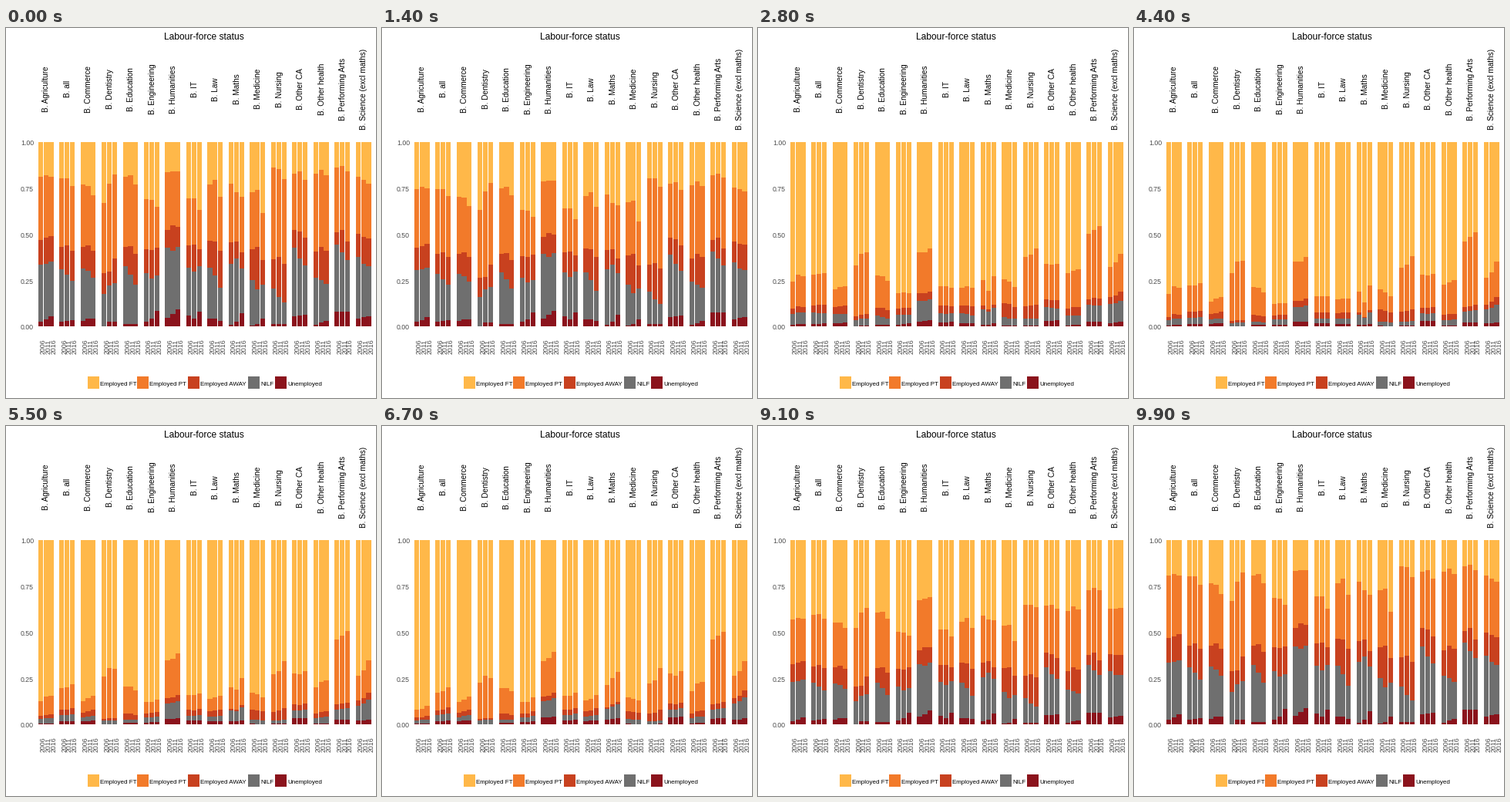
These frames come from a looping animation (480x480 px, 10 s). A matplotlib script:

```python
import numpy as np
import matplotlib.pyplot as plt
from matplotlib.animation import FuncAnimation
from matplotlib.patches import Rectangle

plt.rcParams["font.family"] = "Liberation Sans"

SIZE, DPI = 480, 72
FRAMES, INTERVAL = 100, 100
BASE, HEIGHT = 387, 239
LEFT, PITCH, STEP, BAR = 41.65, 27.47, 6.86, 6.17
GREY = "#4D4D4D"
COLORS = ["#FFB849", "#F27A2A", "#C8411F", "#6F6F6F", "#8B131C"]
YEARS = ["2006", "2011", "2016"]
DEGREES = ["Agriculture", "all", "Commerce", "Dentistry", "Education",
           "Engineering", "Humanities", "IT", "Law", "Maths", "Medicine",
           "Nursing", "Other CA", "Other health", "Performing Arts",
           "Science (excl maths)"]

# Stage one, percent: tops of part-time, away and not-in-labour-force by year
EARLY = [
    (81, 82, 81, 47, 48, 49, 33.5, 34, 35),
    (80.5, 80.5, 76, 43, 44, 41, 31, 28, 24.5),
    (77, 76, 71, 43, 44, 41, 31.5, 30, 26.5),
    (67, 77.5, 82.5, 29, 29.5, 37, 17.5, 22, 23.5),
    (81, 82, 77, 43, 43.5, 39.5, 32.5, 28, 22.5),
    (69, 68.5, 65, 42, 41.5, 42.5, 29, 26, 27.5),
    (83.5, 84, 84, 52.5, 55, 54, 42.5, 41, 43),
    (69.5, 69.5, 63, 44, 44.5, 42, 32, 29.5, 32.5),
    (77, 79.5, 70.5, 46.5, 46, 41, 32, 27.5, 21),
    (77.5, 73, 70.5, 45.5, 46, 40, 34, 37, 31.5),
    (73, 74, 61.5, 42, 43, 36, 25, 20, 22.5),
    (86, 85.5, 80, 36.5, 37.5, 34, 20.5, 16, 13),
    (83, 84, 79.5, 52.5, 51.5, 48, 42.5, 37, 33),
    (83, 85, 82, 40.5, 43, 41, 26.5, 25, 23),
    (86, 87, 84, 51, 52.5, 46, 44.5, 40, 36),
    (81, 79.5, 77.5, 50, 48.5, 47.5, 37.5, 34, 32.5),
]
JOBLESS = [(2.5, 3.8, 5.5), (2.5, 3, 3.5), (3, 4.2, 4.2), (0, 2.5, 2.5),
           (1.3, 1.3, 1.3), (2.7, 4.3, 8.5), (4.6, 6.5, 9), (6, 4.2, 8),
           (4.2, 4.2, 3), (1, 2.5, 7), (0.5, 1.2, 4.2), (1.3, 1.3, 1.3),
           (5.5, 5.9, 6.3), (1, 2, 3), (8, 8, 8), (4.2, 5, 5.5)]

# Later stages: part-time top by year, then mean tops of the inner layers
MIDDLE = [
    (17.5, 22, 21, 6, 4, 0.7), (22, 22.3, 23.5, 8, 4.8, 1.3),
    (13.5, 15, 16, 7.2, 4, 1.5), (29, 35, 35.5, 3.2, 2, 0),
    (21.5, 21, 18.5, 5.8, 2.5, 0.7), (12, 12.5, 12.5, 6.2, 3.8, 0.8),
    (35, 35, 37.5, 14.2, 10.8, 2.5), (16.3, 16.3, 16.3, 7.5, 4.3, 1.8),
    (14.5, 15, 15, 7.3, 4.2, 1.3), (19, 13, 22, 7.1, 6.1, 0.9),
    (20, 18.5, 16.5, 8.3, 2.3, 0.2), (32, 33.5, 38, 8.5, 2.7, 0.4),
    (28, 27.5, 28.5, 10.2, 7, 2.8), (22.5, 24, 25, 6.5, 3.5, 0.5),
    (46, 48.5, 51, 11, 8.2, 2), (26.5, 29.5, 35, 13.6, 10.3, 1.7),
]
LATE = [
    (8, 8.5, 10, 4, 2.4, 0.4), (17, 18, 20, 8.3, 5.5, 1.9),
    (12, 13.5, 15, 7, 4.4, 2), (22.5, 26.5, 25, 3.2, 2.3, 0),
    (19.7, 19.7, 18, 5.5, 2.5, 0.8), (12, 12, 14.5, 6.4, 4, 1.4),
    (34.5, 36, 39.5, 15.8, 13.2, 3.8), (15.5, 15.3, 17, 8.3, 5.3, 2.2),
    (13, 14, 16, 7.7, 4.5, 2), (21.5, 25, 28.5, 10.8, 9.6, 2.8),
    (14.5, 14, 13, 6.8, 2.6, 0.2), (22, 24, 30.5, 6.8, 1.9, 0.2),
    (27.5, 26.5, 29, 11.3, 8.2, 3.8), (18, 22, 23, 6.8, 4, 0.6),
    (46, 48, 50, 11.5, 8.3, 3.2), (26.5, 29, 34.5, 16, 12.8, 2.8),
]


def early_tops():
    tops = np.array(EARLY).reshape(16, 3, 3)
    low = np.array(JOBLESS)[:, None, :]
    return np.concatenate([tops, low], axis=1) / 100


def later_tops(rows):
    rows = np.array(rows)
    part = rows[:, None, :3]
    scale = part / part.mean(axis=2, keepdims=True)
    return np.concatenate([part, rows[:, 3:, None] * scale], axis=1) / 100


STAGES = [early_tops(), later_tops(MIDDLE), later_tops(LATE)]
MOVES = [(9, 33), (43, 67), (77, 100)]


def tops_at(frame):
    for k, (start, end) in enumerate(MOVES):
        if frame <= end:
            t = max(0, (frame - start) / (end - start))
            w = (1 - np.cos(np.pi * t)) / 2
            return (1 - w) * STAGES[k] + w * STAGES[(k + 1) % 3]
    return STAGES[0]


def to_px(x):
    return np.floor(np.asarray(x) + 0.5)


fig = plt.figure(figsize=(SIZE / DPI, SIZE / DPI), dpi=DPI, facecolor="white")
ax = fig.add_axes([0, 0, 1, 1])
ax.set_xlim(0, SIZE)
ax.set_ylim(SIZE, 0)
ax.axis("off")


def label(x, y, text, size, color="black", ha="center", turn=0):
    ax.text(x, y, text, size=size, color=color, ha=ha, va="baseline",
            rotation=turn, rotation_mode="anchor")


lefts = LEFT + PITCH * np.arange(16)[:, None] + STEP * np.arange(3)
x0 = to_px(lefts).ravel()
x1 = to_px(lefts + BAR).ravel()

# Each layer starts at the base and covers the one behind it
layers = [ax.bar(x0, -HEIGHT, x1 - x0, bottom=BASE, align="edge", color=c,
                 linewidth=0, antialiased=False) for c in COLORS]
ax.set_xlim(0, SIZE)
ax.set_ylim(SIZE, 0)

label(257, 15, "Labour-force status", 12)
for name, row in zip(DEGREES, lefts):
    label(row[1] + BAR / 2 + 3.8, 79.3, "B. " + name, 10, turn=90)
    for year, x in zip(YEARS, row):
        label(x + BAR / 2 + 6, 413.5, year, 8.8, GREY, turn=90)
for v in (0, 0.25, 0.5, 0.75, 1):
    label(36, BASE + 4.3 - HEIGHT * v, f"{v:.2f}", 8.8, GREY, ha="right")

KEYS = [(106, "Employed FT"), (170, "Employed PT"), (236, "Employed AWAY"),
        (314, "NILF"), (349, "Unemployed")]
for (x, text), color in zip(KEYS, COLORS):
    ax.add_patch(Rectangle((x, 452), 15, 16, color=color, linewidth=0,
                           antialiased=False))
    label(x + 16.2, 463.8, text, 8, ha="left")


def update(frame):
    heights = to_px(HEIGHT * tops_at(frame))
    for k, bars in enumerate(layers[1:]):
        for bar, h in zip(bars, heights[:, k].ravel()):
            bar.set_height(-h)
    return []


anim = FuncAnimation(fig, update, frames=FRAMES, interval=INTERVAL,
                     init_func=lambda: update(0), repeat=True, repeat_delay=0,
                     blit=False)
plt.show()
```
